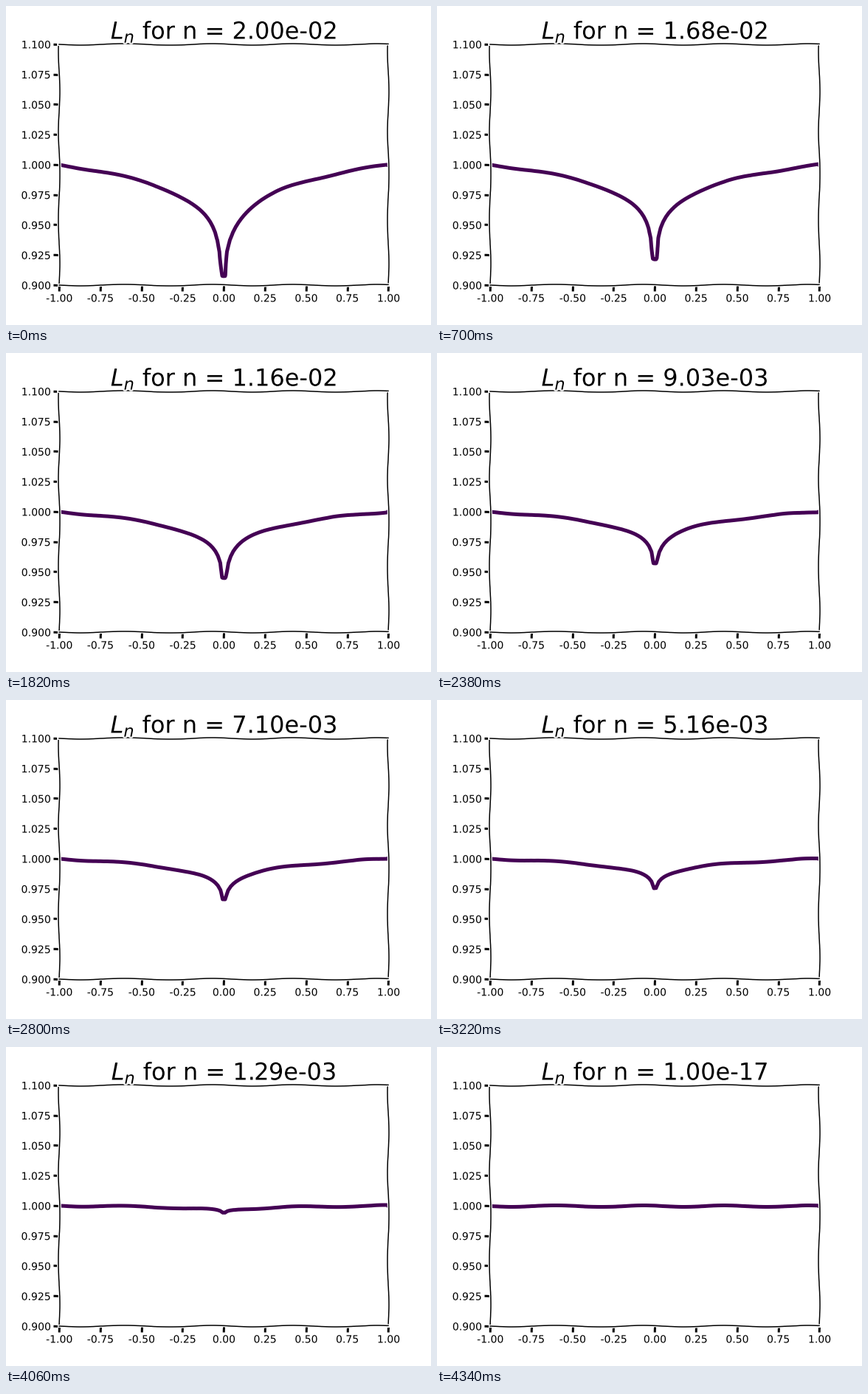
A matplotlib script that plays this animation: 576 by 432 pixels, repeating every 4480 ms.

```python
import matplotlib.pyplot as plt
import numpy as np
from matplotlib.animation import FuncAnimation

FRAMES = 32
LOOP_MS = 4480

plt.xkcd(scale=1, length=128, randomness=2)
plt.rcParams.update({
    "font.family": "DejaVu Sans",
    "figure.subplot.bottom": 0.125,
})

x = np.linspace(-1, 1, 128)
powers = np.linspace(0.02, 1e-17, FRAMES)

fig, ax = plt.subplots(figsize=(8, 6), dpi=72)
line, = ax.plot([], [], color=plt.cm.viridis(0.0), lw=5)
title = ax.set_title("", fontsize=32)
ax.set_xlim(-1, 1)
ax.set_ylim(0.9, 1.1)


def update(i):
    n = powers[i]
    line.set_data(x, np.abs(x) ** n)
    title.set_text(f"$L_n$ for n = {n:.2e}")
    return line, title


anim = FuncAnimation(fig, update, frames=FRAMES, interval=LOOP_MS / FRAMES,
                     repeat=True, repeat_delay=0)
plt.show()
```
